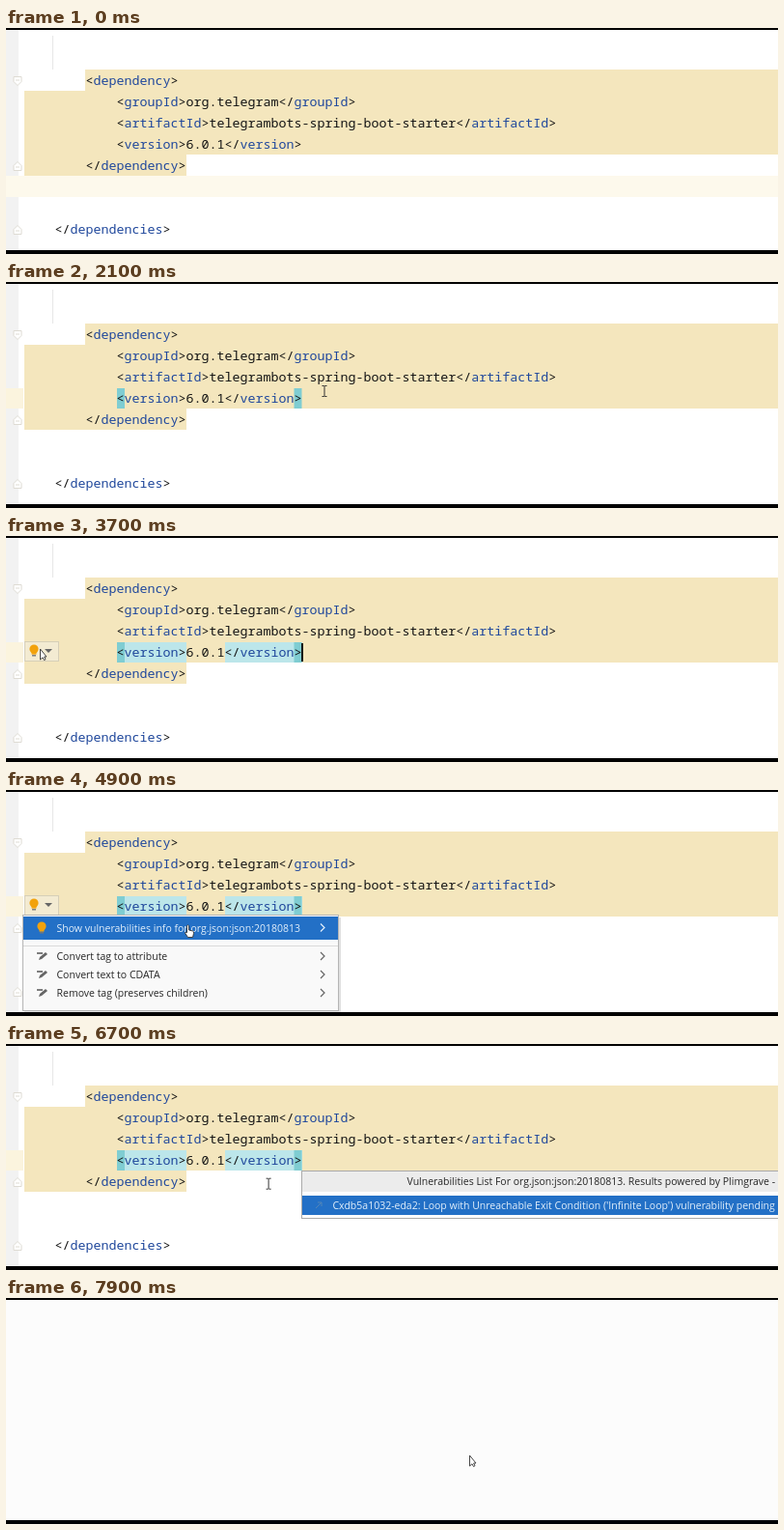
An HTML page that plays this animation: 800x234 px, repeating every 8 s.

```html
<!DOCTYPE html>
<html lang="en">
<head>
<meta charset="utf-8">
<title>Dependency check in an editor</title>
<style>
  html, body { margin: 0; width: 100%; height: 100%; overflow: hidden; background: #fff; }
  svg { display: block; width: 800px; height: 234px; }
  .code { font: 13.333px "Noto Sans Mono", "DejaVu Sans Mono", monospace; fill: #141414; }
  .code .name { fill: #20489c; }
  .ui { font: 10.5px "Open Sans", "Noto Sans", sans-serif; fill: #262626; }
  .light { fill: #e2effb; }
  .chevron { fill: none; stroke: #666; stroke-width: 1.2; }
</style>
</head>
<body>
<svg viewBox="0 0 800 234">
  <defs>
    <g id="bulb">
      <circle r="4.6" fill="#f2a20c"/>
      <path d="M-2.5 3h5v2.6h-5z" fill="#f2a20c"/>
      <path d="M-2 6.8h4" stroke="#777" stroke-width="1.4"/>
    </g>
    <g id="pencil" fill="none" stroke="#555">
      <path d="M-4 4l1-3 6-5 2 2-6 5z" fill="#666" stroke="none"/>
      <path d="M-6-3h6" stroke-width="1.5"/>
    </g>
    <path id="fold" d="M-4-4.5h8v5l-4 4-4-4zM-2-1h4" fill="#fff" stroke="#dedbd3"/>
  </defs>

  <rect width="800" height="234" fill="#fff"/>
  <g id="editor">
    <rect width="13" height="234" fill="#f2f2f2"/>
    <path d="M48.5 8V43" stroke="#e6e6e6"/>
    <path d="M82 43H800V131H187V153H19V65H82z" fill="#f4e6bd"/>
    <rect id="oldLine" y="153" width="800" height="22" fill="#fdf9ec"/>
    <rect id="newLine" y="110" width="18" height="21" fill="#fbf4de"/>
    <use href="#fold" x="12" y="55"/>
    <use href="#fold" transform="translate(12 143) scale(1 -1)"/>
    <use href="#fold" transform="translate(12 209) scale(1 -1)"/>
    <path id="tagMatch" d="M115 110h72v21h-72zM227 110h80v21h-80z" fill="#bce6ea"/>
    <path id="bracketMatch" d="M115 110h8v21h-8zM298.500 110h8v21h-8z" fill="#7fcdd2"/>
    <g id="code" class="code"></g>
    <rect id="caret" x="306" y="111" width="2" height="19" fill="#111"/>

    <g id="bulbButton">
      <rect x="19.500" y="109.500" width="35" height="20" fill="#f3ebd2" stroke="#d6cfb8"/>
      <use href="#bulb" x="29" y="117"/>
      <path d="M40 117h8l-4 4z" fill="#666"/>
    </g>

    <g id="menu">
      <rect x="19" y="132" width="328" height="99" fill="#000" opacity=".12"/>
      <rect x="17.500" y="129.500" width="327" height="99" fill="#f9f9f9" stroke="#b5b5b5"/>
      <rect x="18" y="131" width="326" height="24" fill="#2370c6"/>
      <path d="M18 161.500H344" stroke="#dadada"/>
      <use href="#bulb" x="37" y="141"/>
    </g>

    <g id="popup">
      <rect x="306.500" y="131.500" width="500" height="49" fill="#fff" stroke="#aaa"/>
      <rect x="307" y="132" width="493" height="21" fill="#ececec"/>
      <rect x="307" y="157" width="493" height="20" fill="#2370c6"/>
      <path d="M321 170l6-6m-4 0h4v4" fill="none" stroke="#5285b8"/>
      <text class="ui" x="415.500" y="146">Vulnerabilities List For org.json:json:20180813. Results powered by Plimgrave -</text>
      <text class="ui light" x="338.500" y="170.500">Cxdb5a1032-eda2: Loop with Unreachable Exit Condition ('Infinite Loop') vulnerability pending</text>
    </g>
  </g>

  <rect id="blank" y="2" width="800" height="228" fill="#fcfcfc"/>

  <g id="pointer">
    <path id="beam" d="M-2.500-5.500h2l.5.5.5-.5h2M0-5V5M-2.500 5.500h2l.5-.5.5.5h2" fill="none" stroke="#333"/>
    <path id="arrow" d="M-2.500-6V5l2.500-2.200L1.500 5.500l1.500-.8-1.400-2.700H4z" fill="#fff" stroke="#333" stroke-width=".9"/>
    <path id="hand" d="M-2.500-5.500q1.500-1.500 2 0V-1l4 1q1.500.5 1 2.500L3.500 6.500H-1.500L-4.500 2q0-1.500 2-.3z" fill="#fff" stroke="#333" stroke-width=".9"/>
  </g>
  <path d="M0 0H800V2H0zM0 230H800V234H0z"/>
</svg>
<script>
const LOOP = 8000;
const byId = id => document.getElementById(id);

function add(parent, tag, attrs, text = '') {
  const node = document.createElementNS('http://www.w3.org/2000/svg', tag);
  for (const key in attrs) node.setAttribute(key, attrs[key]);
  node.textContent = text;
  return parent.appendChild(node);
}

function addCode(x, y, source) {
  const line = add(byId('code'), 'text', { x, y });
  for (const part of source.split(/(\w+(?=>))/)) {
    add(line, 'tspan', /^[a-z]+$/i.test(part) ? { class: 'name' } : {}, part);
  }
}

function addMenuItem(y, label, selected) {
  const menu = byId('menu');
  add(menu, 'text', { x: 52.5, y: y + 4, class: selected ? 'ui light' : 'ui' }, label);
  add(menu, 'path', {
    d: `M326 ${y - 4}l4 4-4 4`, class: 'chevron', style: selected ? 'stroke:#e2effb' : ''
  });
  if (!selected) add(menu, 'use', { href: '#pencil', x: 38, y });
}

addCode(82.5, 59, '<dependency>');
addCode(114.5, 81, '<groupId>org.telegram</groupId>');
addCode(114.5, 103, '<artifactId>telegrambots-spring-boot-starter</artifactId>');
addCode(114.5, 125, '<version>6.0.1</version>');
addCode(82.5, 147, '</dependency>');
addCode(50.5, 213, '</dependencies>');

addMenuItem(142.5, 'Show vulnerabilities info for org.json:json:20180813', true);
addMenuItem(172, 'Convert tag to attribute');
addMenuItem(191, 'Convert text to CDATA');
addMenuItem(210, 'Remove tag (preserves children)');

// Pointer stops: time, x, y
const stops = [
  [100, 722, 222], [900, 470, 160], [1500, 330, 113], [2500, 330, 113],
  [3500, 38, 123], [3900, 38, 123], [4700, 190, 146], [5600, 190, 146],
  [5800, 214, 138], [6400, 214, 138], [7400, 483, 169], [LOOP, 483, 169]
];

function pointerAt(t) {
  const next = Math.max(1, stops.findIndex(stop => stop[0] > t));
  const [t0, x0, y0] = stops[next - 1];
  const [t1, x1, y1] = stops[next];
  const k = Math.max(0, (t - t0) / (t1 - t0));
  const eased = k * k * (3 - 2 * k);
  return [x0 + (x1 - x0) * eased, y0 + (y1 - y0) * eased];
}

function show(id, visible) {
  byId(id).style.display = visible ? '' : 'none';
}

function render(t) {
  const within = (from, to) => t >= from && t < to;
  const clicked = t >= 1500;
  const menu = within(3800, 5700);
  const popup = t >= 5700;
  const blank = t >= 7800;
  const [x, y] = pointerAt(t);

  show('oldLine', !clicked);
  show('newLine', clicked);
  show('bracketMatch', clicked);
  show('tagMatch', t >= 2500);
  show('caret', within(1500, 3800) && Math.abs(t % 1000 - 500) < 250);
  show('bulbButton', within(3000, 5700));
  show('menu', menu);
  show('popup', popup);
  show('blank', blank);

  const hand = !blank && (menu && y > 131 || popup && x > 306 && y > 153);
  const arrow = blank || !hand && (x < 55 || menu);
  show('pointer', t >= 100);
  show('hand', hand);
  show('arrow', arrow);
  show('beam', !hand && !arrow);
  byId('pointer').setAttribute('transform', `translate(${x} ${y})`);
}

let start;
function tick(now) {
  start ??= now;
  render((now - start) % LOOP);
  requestAnimationFrame(tick);
}
render(0);
requestAnimationFrame(tick);
</script>
</body>
</html>
```
